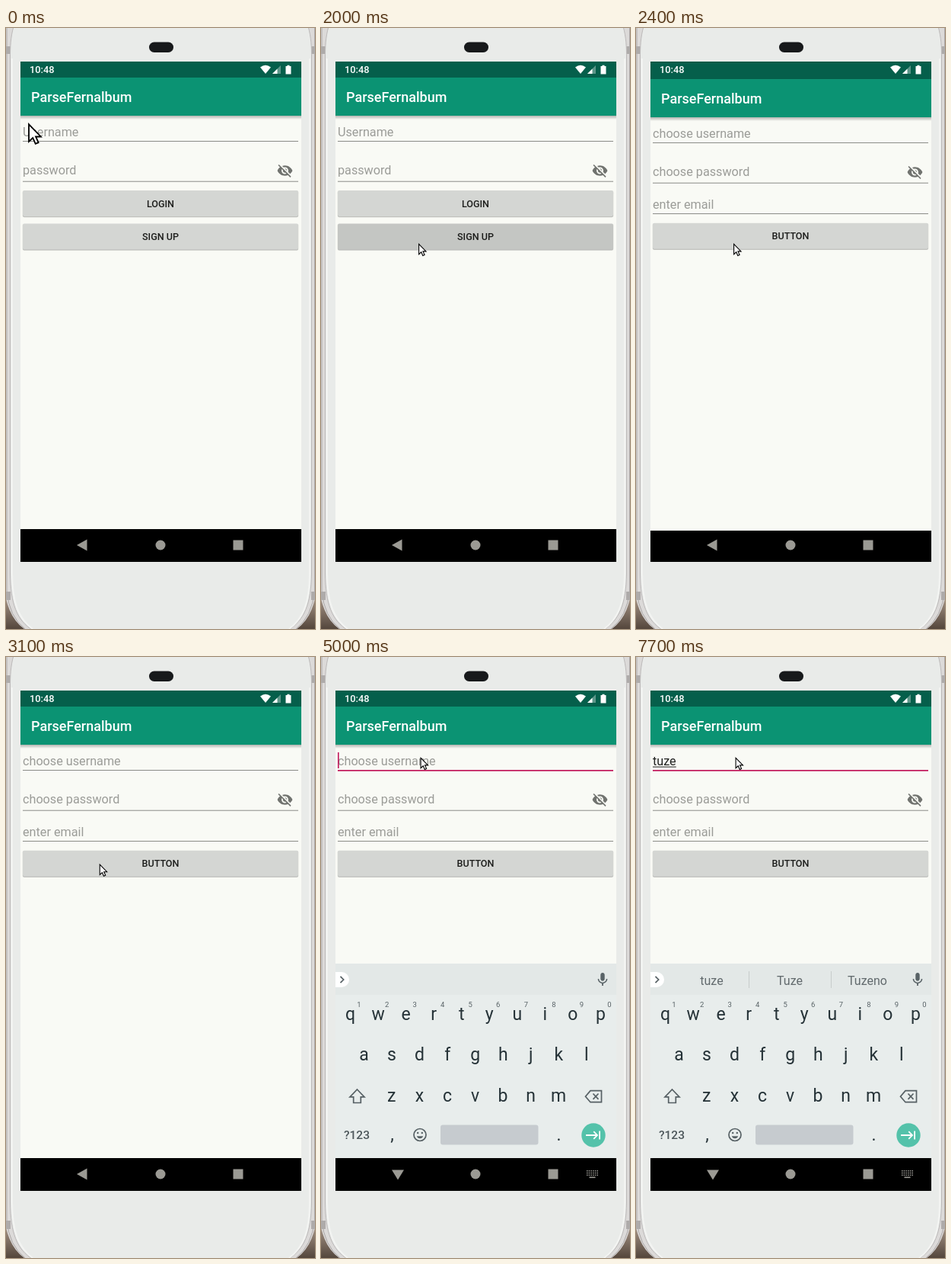
Recreate the animation shown at these times as an HTML page. Size 406x788 px, loop 8 s.

```html
<!DOCTYPE html>
<html lang="en">
<head>
<meta charset="utf-8">
<title>Sign up demo</title>
<style>
html, body { margin: 0; width: 100%; height: 100%; overflow: hidden; background: #d9d8d7; }
svg { display: block; width: 406px; height: 788px; font-family: Roboto, sans-serif; }
.med { font-weight: 500; }
.mid { text-anchor: middle; }
.hint { font-size: 16.2px; fill: #9b9c98; }
.btn { font-size: 12.57px; font-weight: 500; fill: #1d1e1c; text-anchor: middle; }
.key { font-size: 23px; fill: #253237; text-anchor: middle; }
.sup { font-size: 9.5px; fill: #596367; text-anchor: middle; }
.sug { font-size: 16px; fill: #626a6d; text-anchor: middle; }
.line { fill: none; stroke: #566064; stroke-width: 1.7; }
</style>
</head>
<body>
<svg viewBox="0 0 406 788" xmlns="http://www.w3.org/2000/svg">
  <defs>
    <clipPath id="screen"><rect x="19" y="44" width="369" height="656"/></clipPath>
    <clipPath id="aboveNav"><rect x="19" y="44" width="369" height="613"/></clipPath>
    <clipPath id="signBtn"><rect x="22" y="256.5" width="362" height="34" rx="2"/></clipPath>
    <clipPath id="reveal"><rect id="revealBox" x="19" y="44" width="369" height="660"/></clipPath>
    <linearGradient id="shade" x2="0" y2="1">
      <stop stop-color="#000" stop-opacity=".28"/><stop offset="1" stop-color="#000" stop-opacity="0"/>
    </linearGradient>
    <linearGradient id="table" x2="0" y2="1">
      <stop stop-color="#a39284"/><stop offset="1" stop-color="#54463c"/>
    </linearGradient>
  </defs>

  <g id="phone">
    <rect width="406" height="788" fill="#dcdad9"/>
    <path d="M0 748Q6 775 24 788H0ZM406 748Q400 775 382 788H406Z" fill="url(#table)"/>
    <path d="M1 0V738Q4 772 25 788M405.500 0V738Q402 772 381 788" fill="none" stroke="#aaa6a6"/>
    <path d="M0 24h6v10h-6zM401 24h5v10h-5zM0 739h6v11h-6zM401 739h5v11h-5z" fill="#aeabaa"/>
    <path d="M10 -2C6 12 5.500 24 5.500 40V715C6 755 14 777 36 790H370C392 777 401 755 401.500 715V40C401.500 24 401 12 397 -2Z" fill="#e9ebe9" stroke="#bbb8b8"/>
    <path d="M8 40V715C8 752 16 774 35 788M399 40V715C399 752 391 774 372 788" fill="none" stroke="#f3f4f2" stroke-width="2"/>
    <rect x="188" y="18.500" width="32" height="13.500" rx="6.700" fill="#17191b"/>
  </g>

  <g clip-path="url(#screen)">
    <rect x="19" y="44" width="369" height="656" fill="#000"/>
    <g id="nav" fill="#9b9a94">
      <path id="back"/>
      <circle cx="203" cy="678" r="6.500"/>
      <rect x="298.500" y="671.500" width="13" height="13"/>
      <g id="imeIcon"></g>
    </g>
    <g id="login"></g>
    <rect id="dim" x="19" y="44" width="369" height="613"/>
    <g clip-path="url(#reveal)"><g id="signup"></g></g>
    <g clip-path="url(#aboveNav)"><g id="keyboard"></g></g>
    <g id="status" fill="#fff">
      <text class="med" x="31" y="59.300" font-size="12.8">10:48</text>
      <path d="M334 51.500Q341 46 348 51.500L341 60Z"/>
      <path d="M361 49V60H350Z" opacity=".35"/>
      <path d="M356.500 53.500V60H350Z"/>
      <path d="M367.500 50h2v-1.300h3v1.300h2v10.500h-7z"/>
    </g>
  </g>
  <path id="pointer" d="M.6 .8V14.200L3.700 11.300L5.800 16L8.100 15L6 10.400H10Z" fill="#fff" stroke="#000" stroke-width="1.1"/>
</svg>
<script>
const $ = id => document.getElementById(id);
const set = (id, attrs) => { for (const k in attrs) $(id).setAttribute(k, attrs[k]); };
const text = (cls, x, y, s, id = "") => `<text class="${cls}" x="${x}" y="${y}" id="${id}">${s}</text>`;
const rect = (x, y, w, h, fill, more = "") =>
  `<rect x="${x}" y="${y}" width="${w}" height="${h}" fill="${fill}" ${more}/>`;
const clamp = v => Math.max(0, Math.min(1, v));
const smooth = v => { v = clamp(v); return v * v * (3 - 2 * v); };
const shift = (x, y) => `translate(${x} ${y})`;

const EYE = "M12 7c2.760 0 5 2.240 5 5 0 .65-.13 1.260-.36 1.830l2.920 2.920c1.510-1.260 2.700-2.890 3.430-4.750-1.730-4.390-6-7.500-11-7.500-1.400 0-2.740.25-3.980.7l2.160 2.160C10.740 7.130 11.350 7 12 7zM2 4.270l2.740 2.740C3.080 8.300 1.780 10.020 1 12c1.730 4.390 6 7.500 11 7.500 1.550 0 3.030-.3 4.380-.84L19.730 22 21 20.730 3.270 3 2 4.270zM7.530 9.800l1.550 1.550c-.05.21-.08.43-.08.65 0 1.660 1.340 3 3 3 .22 0 .44-.03.65-.08l1.550 1.550c-.67.33-1.410.53-2.200.53-2.760 0-5-2.240-5-5 0-.79.2-1.530.53-2.200zm4.310-.78l3.150 3.150.02-.16c0-1.660-1.340-3-3-3l-.17.01z";
const MIC = "M12 14c1.660 0 3-1.340 3-3V5c0-1.660-1.340-3-3-3S9 3.340 9 5v6c0 1.660 1.340 3 3 3zm5.300-3c0 3-2.540 5.100-5.300 5.100S6.700 14 6.700 11H5c0 3.410 2.720 6.230 6 6.720V21h2v-3.280c3.280-.48 6-3.300 6-6.720z";
const TAB = "M11.590 7.410L15.170 11H1v2h14.170l-3.590 3.590L13 18l6-6-6-6zM20 6v12h2V6z";
const icon = (d, x, y, fill) =>
  `<path d="${d}" fill="${fill}" transform="translate(${x} ${y}) scale(.9) translate(-12 -12)"/>`;

const underline = (y, id = "") => rect(22, y, 362, 1, "#8b8c88", `id="${id}"`);
const button = (y, label) =>
  rect(22, y + 1.2, 362, 34, "#000", 'rx="2" opacity=".2"') +
  rect(21.5, y + .5, 363, 34, "#000", 'rx="2" opacity=".08"') +
  rect(22, y, 362, 34, "#d4d6d3", 'rx="2"') + text("btn", 203, y + 21.7, label);

const appWindow = body =>
  rect(19, 44, 369, 613, "#f9faf5") + rect(19, 115, 369, 5, "url(#shade)") +
  rect(19, 44, 369, 21, "#055f4b") + rect(19, 65, 369, 50, "#0b9373") +
  `<text class="med" x="33" y="97.300" font-size="18" fill="#fff">ParseFernalbum</text>` +
  body + icon(EYE, 366.5, 187, "#71736f");

$("login").innerHTML = appWindow(
  text("hint", 22, 141.6, "Username") + underline(148) +
  text("hint", 22, 192.4, "password") + underline(200.7) +
  button(213, "LOGIN") + button(256.5, "SIGN UP") +
  '<g clip-path="url(#signBtn)"><circle id="ripple" cx="128" cy="283"/></g>');

$("signup").innerHTML = appWindow(
  text("hint", 22, 141.6, "choose username", "userHint") + underline(148, "userLine") +
  '<text id="typed" x="22" y="141.600" font-size="16.2" fill="#20211f"></text>' +
  rect(22, 143.6, 0, 1, "#20211f", 'id="compose"') +
  rect(22, 125, 1.6, 21, "#c2185b", 'id="caret"') +
  text("hint", 22, 192.4, "choose password") + underline(200.7) +
  text("hint", 22, 235, "enter email") + underline(241) +
  button(253.7, "BUTTON"));

function buildKeyboard() {
  const row = (letters, x, y) =>
    [...letters].map((c, i) => text("key", x + 36.55 * i, y, c)).join("");
  const digits = [..."1234567890"].map((d, i) => text("sup", 50 + 36.55 * i, 459.3, d)).join("");
  return rect(19, 402, 369, 256, "#e8edec") + rect(19, 402, 369, 41, "#e3e8e7") +
    '<path d="M19 413h8a10 10 0 0 1 0 20h-8z" fill="#fff"/>' +
    '<path d="M25.500 418.800l4.200 4.200l-4.200 4.200" class="line"/>' +
    `<g id="dividers">${rect(148, 412, 1, 22, "#c7cccb")}${rect(256, 412, 1, 22, "#c7cccb")}</g>` +
    text("sug", 99.5, 429.6, "", "sug0") + text("sug", 202, 429.6, "", "sug1") +
    text("sug", 304, 429.6, "", "sug2") + icon(MIC, 370, 423, "#596367") +
    row("qwertyuiop", 38.5, 476.3) + digits +
    row("asdfghjkl", 56.5, 529) + row("zxcvbnm", 92.8, 582.6) +
    '<path d="M47.500 567L57 576.800H52.300V584.500H42.700V576.800H38Z" class="line"/>' +
    '<path d="M354 568.700H368.500V583.700H354L347.500 576.200ZM357.500 572.500l7 7.400m0-7.400l-7 7.400" class="line"/>' +
    '<text class="med mid" x="47" y="632" font-size="15.500" fill="#4d575b">?123</text>' +
    text("key", 93.5, 633.5, ",") + text("key", 312.5, 633.5, ".") +
    '<circle cx="130" cy="626.500" r="8" class="line"/>' +
    '<path d="M125.800 628.300a4.500 4.500 0 0 0 8.400 0z" fill="#566064"/>' +
    '<circle cx="127.200" cy="624" r="1.200" fill="#566064"/><circle cx="132.800" cy="624" r="1.200" fill="#566064"/>' +
    rect(157, 613.5, 128.5, 26, "#c6cbcf", 'rx="3"') +
    '<circle cx="358" cy="627" r="15.700" fill="#54c2aa"/>' + icon(TAB, 358, 627, "#fff");
}
$("keyboard").innerHTML = buildKeyboard();

let dots = rect(352.5, 681.5, 8, 1.6, "#9b9a94");
for (let r = 0; r < 3; r++)
  for (let c = 0; c < 6; c++) dots += rect(349 + c * 2.7, 673 + r * 2.8, 1.5, 1.5, "#9b9a94");
$("imeIcon").innerHTML = dots;

function pointerAt(t) {
  if (t < 300) return [29, 125, 1.68];
  if (t < 3000) {
    const p = smooth((t - 400) / 1100);
    return [33 + 95 * p, 129 + 153.5 * p, 1];
  }
  const p = smooth((t - 3000) / 600);
  return [128 + 2.5 * p - 24 * Math.sin(Math.PI * p), 282.5 - 151 * p, 1];
}

function caretOn(t) {
  if (t < 4000) return false;
  if (t < 5800) return Math.floor((t - 4000) / 500) % 2 === 0;
  return t < 6600 || (t >= 7200 && t < 7700);
}

// progress of the new screen at 100 ms steps from 2200
const SLIDE = [.02, .7, .925, .98, 1];
const REVEAL = [.09, .8, 1, 1, 1];

function render(t) {
  const [x, y, s] = pointerAt(t);
  set("pointer", { transform: `translate(${x} ${y}) scale(${s})` });

  const press = (t - 1700) / 100;
  set("ripple", { r: press < 0 ? 0 : 45 + 75 * press, opacity: press < 0 ? 0 : .11 * clamp((5 - press) / 3) });

  const step = Math.floor((t - 2200) / 100);
  const open = step >= 0;
  const k = Math.max(0, Math.min(4, step));
  set("login", { transform: shift(0, open ? -13 * SLIDE[k] : 0) });
  set("dim", { opacity: open ? .05 : 0 });
  const off = 27 * (1 - SLIDE[k]);
  set("signup", { transform: shift(0, off), visibility: open ? "visible" : "hidden" });
  set("revealBox", { y: 44 + 629 * (1 - REVEAL[k]) + (k ? 0 : -1.5) });

  const focus = t >= 4000;
  const ime = t >= 4100;
  set("userLine", { fill: focus ? "#c2185b" : "#8b8c88", height: focus ? 1.7 : 1 });
  set("back", { d: ime ? "M93 672.500H109L101 685.500Z" : "M93 678L106.500 670.500V685.500Z" });
  set("imeIcon", { visibility: ime ? "visible" : "hidden" });

  const up = clamp((t - 4200) / 300);
  set("keyboard", { opacity: up, transform: shift(0, 51 * (1 - up) ** 2) });

  const count = t < 5800 ? 0 : t < 5900 ? 1 : t < 6000 ? 2 : t < 6200 ? 3 : 4;
  const word = "tuze".slice(0, count);
  $("typed").textContent = word;
  const width = count ? $("typed").getComputedTextLength() : 0;
  set("compose", { width });
  set("caret", { x: 22 + (count ? width - .4 : 0), visibility: caretOn(t) ? "visible" : "hidden" });
  set("userHint", { visibility: count ? "hidden" : "visible" });
  set("dividers", { opacity: count ? 1 : 0 });
  $("sug0").textContent = word;
  $("sug1").textContent = !count ? "" : count < 4 ? "Tuzo" : "Tuze";
  $("sug2").textContent = count ? "Tuzeno" : "";
}

const start = performance.now();
function tick(now) {
  const t = Math.max(0, now - start) % 8000;
  render(Math.floor(t / 100) * 100);
  requestAnimationFrame(tick);
}
render(0);
requestAnimationFrame(tick);
</script>
</body>
</html>
```
